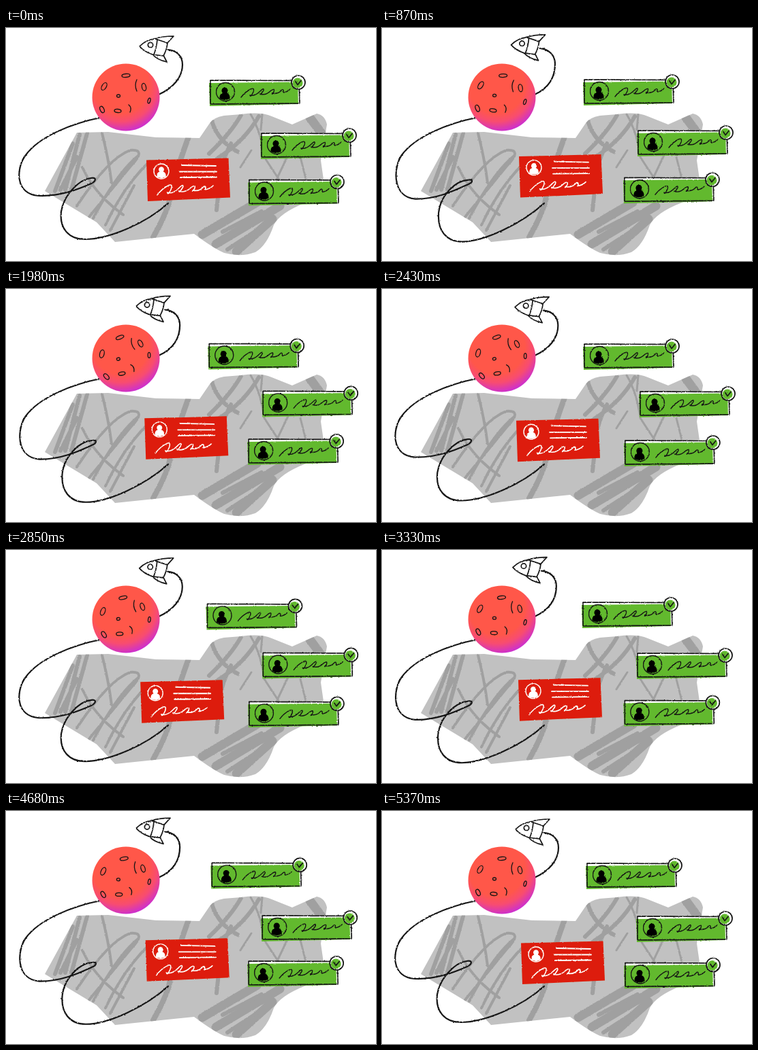
Animation, 543 px wide and 343 px high, one loop 5400 ms. Source, as an HTML page:

```html
<!DOCTYPE html>
<html lang="en">
<head>
<meta charset="utf-8">
<title>Space cards</title>
<style>
  html, body { margin: 0; width: 100%; height: 100%; overflow: hidden; background: #fff; }
  svg { display: block; width: 543px; height: 343px; }
  .ink { fill: none; stroke: #151515; stroke-width: 1.7; stroke-linecap: round; stroke-linejoin: round; }
  .paper { fill: #fff; }
  .chalk { fill: none; stroke: #fff; stroke-width: 1.8; stroke-linecap: round; }
</style>
</head>
<body>
<svg viewBox="0 0 543 343">
  <defs>
    <filter id="rough" x="-10%" y="-10%" width="120%" height="120%">
      <feTurbulence type="fractalNoise" baseFrequency=".45" numOctaves="2" seed="4"/>
      <feDisplacementMap in="SourceGraphic" scale="2.2" xChannelSelector="R" yChannelSelector="G"/>
    </filter>
    <radialGradient id="glow" gradientUnits="userSpaceOnUse" cx="168" cy="84" r="69">
      <stop offset=".6" stop-color="#ff5749"/>
      <stop offset=".78" stop-color="#f84c70"/>
      <stop offset="1" stop-color="#cc2fd0"/>
    </radialGradient>
    <path id="rockShape" d="M57 240L104 154L150 153L220 161L284 162L299 140Q304 132 320 129L345 127Q374 123 390 130L420 142L456 126Q468 128 471 142L462 195L467 230L460 248L440 257Q402 272 393 290Q383 320 366 330Q345 338 320 331Q304 324 276 303L160 315L133 286Z"/>
    <clipPath id="rockClip"><use href="#rockShape"/></clipPath>
    <path id="scribble" d="M0 12Q6 4 14 0Q20-3 18 4Q14 13 13 9Q20 11 28 3Q34-3 33 2Q28 10 28 7Q36 10 44 2Q50-2 48 4Q44 9 46 6Q54 8 60 1Q63 0 62 5Q68 4 72 0"/>
    <path id="person" d="M0-7.5a4.6 4.6 0 0 1 3 8Q8 2 7.500 9Q0 13-7.500 9Q-8 2-3 .5a4.600 4.600 0 0 1 3-8Z"/>
    <g id="greenCard" filter="url(#rough)">
      <path class="paper" d="M0 0L130 .5L131 34L0 35Z"/>
      <path fill="#62b92d" d="M-2 4L128 2.500L129 35L-1 38Z"/>
      <path class="ink" stroke-dasharray="13 1.8 7 1.6" d="M0 0L130 .5L131 34L0 35Z"/>
      <circle class="ink" cx="22" cy="17" r="13.500" style="stroke-width:1.4"/>
      <use href="#person" x="21" y="18"/>
      <use href="#scribble" class="ink" x="45" y="13" style="stroke-width:1.4"/>
      <circle cx="129" cy="3" r="10" class="ink" style="fill:#fff"/>
      <circle cx="128" cy="4" r="7.500" fill="#62b92d"/>
      <path class="ink" d="M125 2l3 4.500l5-6"/>
    </g>
  </defs>

  <use href="#rockShape" fill="#c1c1c1"/>
  <g clip-path="url(#rockClip)">
    <g filter="url(#rough)" fill="none" stroke="#a0a0a0" stroke-linecap="round">
      <path stroke-width="6" d="M119 155L96 238M108 157L87 238M98 170L72 240M104 190L80 238"/>
      <path stroke-width="4" d="M141 155Q150 190 155 228M104 262Q150 192 182 180Q207 178 184 202L122 278M128 280Q163 213 194 188M146 290Q172 234 211 196M153 298L188 232M112 205Q130 245 172 275"/>
      <path stroke-width="8" d="M268 160Q246 220 239 258Q232 280 216 308"/>
      <path stroke-width="6" d="M302 137Q312 168 340 182M345 128Q330 155 298 185M371 130Q350 167 310 192M330 170Q312 205 312 240L309 268"/>
      <path stroke-width="3" d="M359 127Q374 152 379 190L400 222M376 127L374 150M344 205L360 180M415 185L396 225M432 190L440 222"/>
      <path stroke-width="13" d="M288 304L368 257M308 318L402 262M338 329L391 281"/>
      <path stroke-width="6" d="M318 300L375 270M325 326L380 290"/>
      <path stroke-width="13" d="M446 132L470 164"/>
    </g>
  </g>

  <path id="trail" class="ink" filter="url(#rough)" style="stroke-width:2.200"/>
  <circle cx="176" cy="102" r="49.500" fill="url(#glow)"/>
  <g id="craters" class="ink" style="stroke-width:1.300">
    <ellipse cx="144" cy="86" rx="3.200" ry="6" transform="rotate(30 144 86)"/>
    <ellipse cx="176" cy="70" rx="6" ry="2.500" transform="rotate(-5 176 70)"/>
    <path d="M192 76Q188 84 192 93"/>
    <ellipse cx="202.500" cy="87" rx="3" ry="5.500" transform="rotate(-12 202 87)"/>
    <ellipse cx="210" cy="107" rx="1.800" ry="4" transform="rotate(15 210 107)"/>
    <ellipse cx="165" cy="100" rx="2.500" ry="2"/>
    <ellipse cx="141" cy="120" rx="2.800" ry="5" transform="rotate(-25 141 120)"/>
    <ellipse cx="164" cy="122" rx="5" ry="2.500" transform="rotate(5 164 122)"/>
    <path d="M180 113Q185 117 182 124"/>
  </g>

  <g id="rocket" class="ink">
    <g filter="url(#rough)" style="fill:#fff">
      <path d="M217 16Q230 12 246 12L236 23M215 39Q222 47 236 50L231 40"/>
      <path d="M196 27Q206 17 219 16L237 22Q236 32 231 41L215 39Q203 35 196 27Z"/>
      <path d="M222 17Q221 29 217 39"/>
      <circle cx="212" cy="25" r="3.700"/>
    </g>
  </g>

  <g id="red">
    <g filter="url(#rough)">
      <path fill="#dd1f08" d="M206 194.500L326.500 191.500L329 249.500L208 255Z"/>
      <circle class="chalk" cx="228" cy="211" r="11" style="stroke-width:1.400"/>
      <use href="#person" class="paper" transform="translate(228 211) scale(.9)"/>
      <path class="chalk" d="M258 202L308 203M255 211.500L309 211.500M256 220L309 219.500"/>
      <use href="#scribble" class="chalk" transform="translate(222 232) scale(1.140 1.150)" style="stroke-width:1.400"/>
    </g>
  </g>
  <use id="card1" href="#greenCard"/>
  <use id="card2" href="#greenCard"/>
  <use id="card3" href="#greenCard"/>
</svg>
<script>
const LOOP = 5400, STEP = 30;
const times = [0, 870, 1530, 2430, 3330, 3990, 5370];
const drift = {
  redX: [0, -5, 3, -9, -6, -1, -2],
  oneX: [0, -3, -1, -3, -5, 2, 1],
  oneY: [0, -1, 2, 4, 0, -1, 0],
  twoX: [0, 1, 0, 4, 0, 2, 0],
  twoY: [0, -4, -5, -4, -3, -2, 0],
  spin: [0, 3, -14, -14, -1, -8, 0]
};
const $ = id => document.getElementById(id);
const move = (id, x, y) => $(id).setAttribute('transform', `translate(${x} ${y})`);

// Smooth closed curve through values at the key times
function wander(values, t) {
  const n = times.length;
  const time = i => times[(i + n) % n] + LOOP * Math.floor(i / n);
  const value = i => values[(i + n) % n];
  const slope = i => (value(i + 1) - value(i - 1)) / (time(i + 1) - time(i - 1));
  let i = n - 1;
  while (times[i] > t) i--;
  const span = time(i + 1) - time(i), u = (t - time(i)) / span, v = 1 - u;
  return v * v * (1 + 2 * u) * value(i) + u * u * (3 - 2 * u) * value(i + 1)
    + span * u * v * (v * slope(i) - u * slope(i + 1));
}

function trail(d) {
  return `M${238 - 9 * d} ${32 - 3 * d}
    C${250 - 8 * d} ${33 - 3 * d} ${259 - 7 * d} ${41 - 2 * d} ${259 - 7 * d} ${54 - 2 * d}
    C${259 - 7 * d} 72 246 88 224 98
    M138 132C100 140 50 158 29 187
    C${15 + 2 * d} 205 ${12 + 3 * d} ${244 + 6 * d} ${48 + d} ${247 + 6.5 * d}
    C80 ${248 + 6 * d} 107 ${237 + 3 * d} ${125 + d} ${229 + 2 * d}
    C${133 + 2 * d} ${225 + 3 * d} ${133 + 2 * d} ${219 + 4 * d} ${124 + 2 * d} ${221 + 4 * d}
    C108 ${223 + 3 * d} ${85 + 2 * d} 245 ${81 + 3 * d} ${270 + 2 * d}
    C${78 + 4 * d} ${295 + 4 * d} ${92 + 3 * d} ${311 + 5 * d} ${116 + 2 * d} ${311 + 5 * d}
    C150 ${311 + 5 * d} 205 288 238 258`;
}

function draw(now) {
  const t = Math.floor(now % LOOP / STEP) * STEP;
  const at = name => wander(drift[name], t);
  const sway = (1 - Math.cos(4 * Math.PI * t / LOOP)) / 2;
  $('trail').setAttribute('d', trail(sway));
  move('rocket', -9 * sway, -3 * sway);
  move('red', at('redX'), -7.5 * sway);
  move('card1', 300 + at('oneX'), 77 + at('oneY'));
  move('card2', 375 + at('twoX'), 155 + at('twoY'));
  move('card3', 357 - 1.5 * sway, 223.5 - 4.5 * sway);
  $('craters').setAttribute('transform', `rotate(${at('spin')} 176 102)`);
  requestAnimationFrame(draw);
}
draw(0);
</script>
</body>
</html>
```
